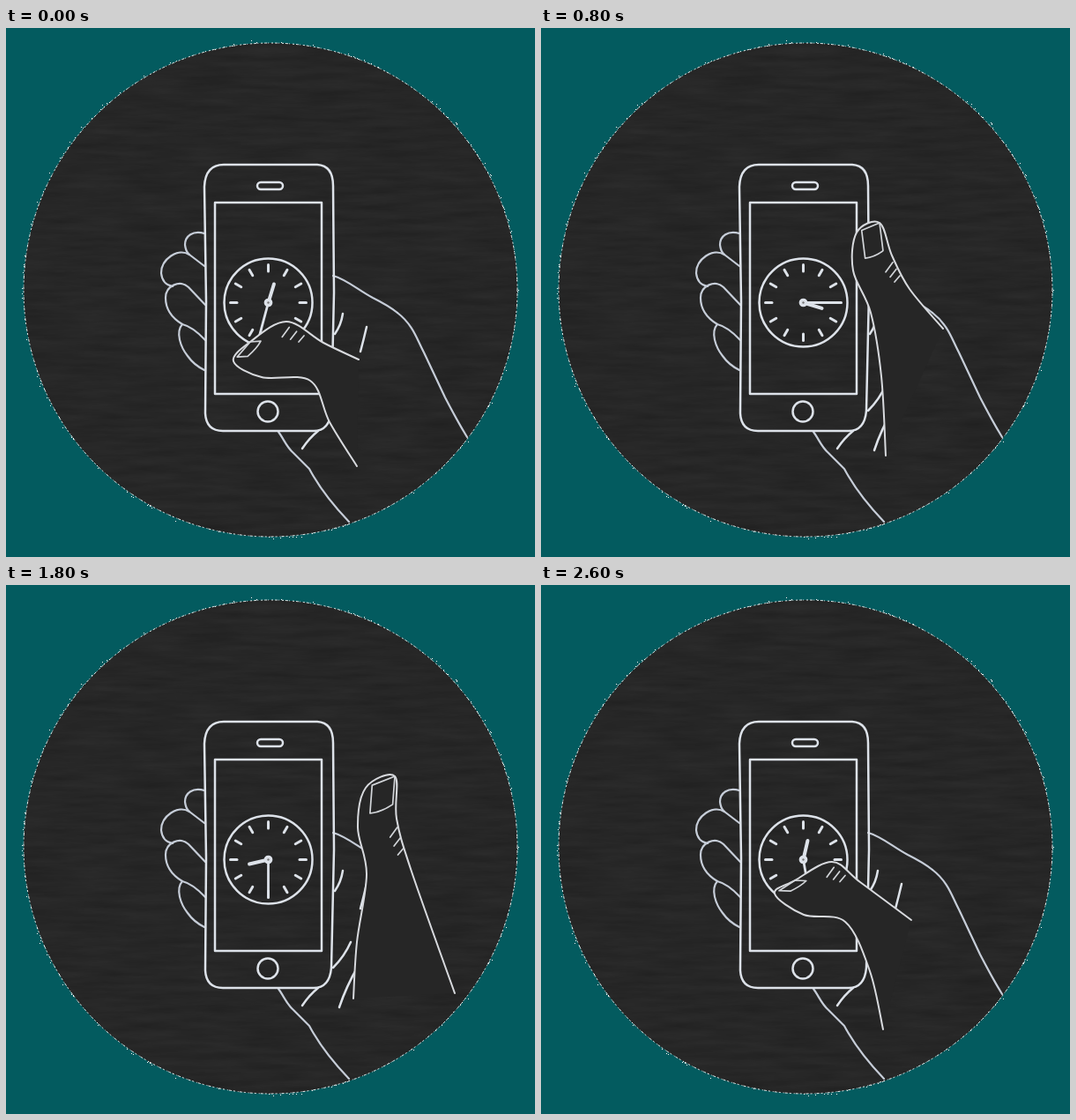
An HTML page for the animation above (2700 ms loop, 600x600 px).

```html
<!DOCTYPE html>
<html lang="en">
<head>
<meta charset="utf-8">
<title>Thumb turning a phone clock</title>
<style>
  html, body { margin: 0; width: 100%; height: 100%; overflow: hidden; background: #035b5f; }
  svg { display: block; width: 100vw; height: 100vh; }
  .chalk { fill: none; stroke: #dde2e9; stroke-width: 2.5; stroke-linecap: round; stroke-linejoin: round; }
  .soft { stroke: #c6cdd8; stroke-width: 2.2; }
  .thin { stroke: #d2d5d9; stroke-width: 1.7; }
  #thumb { fill: #262626; stroke: #d8dade; stroke-width: 2; }
</style>
</head>
<body>
<svg viewBox="0 0 600 600">
  <defs>
    <filter id="board" x="0" y="0" width="1" height="1" color-interpolation-filters="sRGB">
      <feTurbulence type="fractalNoise" baseFrequency=".015 .13" numOctaves="4" seed="4"/>
      <feColorMatrix values=".05 0 0 0 .126  .05 0 0 0 .126  .05 0 0 0 .126  0 0 0 0 1"/>
    </filter>
    <clipPath id="disc"><circle cx="300" cy="297" r="280"/></clipPath>
  </defs>

  <rect width="600" height="600" fill="#035b5f"/>
  <g clip-path="url(#disc)">
    <rect x="20" y="17" width="560" height="560" filter="url(#board)"/>
  </g>
  <g id="specks" fill="#f4f6f6"></g>
  <circle cx="300" cy="297" r="280" fill="none" stroke="#eef2f2" stroke-dasharray="2 2 3 1 1 3"/>

  <g class="chalk soft">
    <path d="M225 233C212 229 203 236 203 246Q204 254 208 257"/>
    <path d="M225 270L208 257C195 249 176 262 176 278C177 288 183 292 189 293"/>
    <path d="M226 314L207 294C198 285 181 292 181 306C181 320 190 330 200 336Q212 339 226 354"/>
    <path d="M200 336C192 345 198 362 206 372Q213 382 225 388"/>
    <path d="M309 458C315 466 318 475 326 482L344 500C352 515 365 535 389 560"/>
    <path d="M371 281C386 285 399 297 416 306Q434 315 444 323"/>
    <path id="wrist" d="M444 323C462 337 466 353 474 368L498 419Q512 446 523 464"/>
  </g>

  <g class="chalk">
    <path d="M354 457Q344 465 336 477M382 324Q380 337 373 347M409 339Q406 352 402 367"/>
    <path id="folds" d="M391 405Q384 421 371 434M399 433Q386 455 378 479"/>
    <path d="M247 155H353Q371 156 371 179L372 300L369 434Q367 457 349 457H246Q227 457 226 437L227 310L225 180Q226 155 247 155Z"/>
    <path d="M237 198H358V415H237Z"/>
    <rect x="285" y="175" width="29" height="8" rx="4"/>
    <circle cx="297" cy="435" r="11.5"/>
    <g transform="translate(297.5 311.5)">
      <circle r="50"/>
      <g id="ticks"></g>
      <path id="hour" d="M0 0V-22" stroke-width="4"/>
      <path id="minute" d="M0 0V-42" stroke-width="2.8"/>
      <circle r="3.6" fill="#dde2e9"/>
      <circle r="1.2" stroke="none" fill="#777"/>
    </g>
  </g>

  <g class="chalk">
    <path id="thumb"/>
    <path id="nail" class="thin"/>
    <path id="wrinkles" class="thin"/>
  </g>
</svg>

<script>
const LOOP = 2700, STEP = 100;
const $ = id => document.getElementById(id);
const make = (parent, tag, attrs) => {
  const el = document.createElementNS('http://www.w3.org/2000/svg', tag);
  for (const k in attrs) el.setAttribute(k, attrs[k]);
  parent.append(el);
};
const mix = (a, b, u) => a.map((v, k) => v + (b[k] - v) * u);
const move = ([x, y], dx, dy) => [x + dx, y + dy];

for (let a = 0; a < 360; a += 30) make($('ticks'), 'path', { d: 'M0 -35.5V-43', 'stroke-width': 3, transform: `rotate(${a})` });

let seed = 7;
const rand = () => (seed = seed * 16807 % 2147483647) / 2147483647;
for (let i = 0; i < 140; i++) {
  const a = rand() * Math.PI * 2, r = 280 + rand() * rand() * 4;
  make($('specks'), 'rect', { x: Math.round(299.5 + r * Math.cos(a)), y: Math.round(296.5 + r * Math.sin(a)), width: 1, height: 1 });
}

// Thumb points: wrist, inner edge, web, pad, tip (two), knuckle, joint, outer end
const points = text => text.split(' ').map(p => p.split(',').map(Number));
const raised = points('402,469 406,405 417,328 407,275 416,230 449,217 451,265 468,325 517,463');
const pose = (time, hour, minute, pts) => ({ time, values: [hour, minute, ...pts.flat()] });
const poses = [
  pose(0, 17, 195, points('398,497 367,447 345,400 290,396 258,378 277,356 318,333 360,357 400,376')),
  pose(400, 50, 660, points('386,495 361,428 338,378 290,354 261,322 284,300 332,315 368,347 431,387')),
  pose(800, 107, 1170, points('391,485 386,395 374,323 354,275 358,232 384,221 398,258 418,296 456,341')),
  pose(1400, 197, 2160, raised),
  pose(1800, 257, 3060, raised.map(p => move(p, -8, 0))),
  pose(2200, 318, 3960, points('397,500 389,425 392,355 345,318 312,284 334,262 375,284 412,285 456,350')),
  pose(2600, 373, 4490, points('388,504 373,438 345,382 298,374 265,350 288,335 330,314 362,337 420,380'))
];

// Pose by index, wrapping around the loop; the hands keep turning.
const TURN = [360, 4320];
function at(i) {
  const n = poses.length, lap = Math.floor(i / n), p = poses[i - lap * n];
  return { time: p.time + lap * LOOP, values: p.values.map((v, k) => v + lap * (TURN[k] || 0)) };
}

// Smooth curve through the poses in time
function sample(t) {
  let i = poses.length - 1;
  while (poses[i].time > t) i--;
  const [a, b, c, d] = [at(i - 1), at(i), at(i + 1), at(i + 2)];
  const span = c.time - b.time, u = (t - b.time) / span, w = 1 - u;
  return b.values.map((v, k) => {
    const m0 = (c.values[k] - a.values[k]) / (c.time - a.time) * span;
    const m1 = (d.values[k] - v) / (d.time - b.time) * span;
    return v * w * w * (1 + 2 * u) + c.values[k] * u * u * (3 - 2 * u) + m0 * u * w * w - m1 * u * u * w;
  });
}

// Catmull-Rom spline as a cubic path
function spline(pts) {
  const p = i => pts[Math.max(0, Math.min(pts.length - 1, i))];
  let d = 'M' + pts[0];
  for (let i = 0; i < pts.length - 1; i++) {
    const [a, b, c, e] = [p(i - 1), p(i), p(i + 1), p(i + 2)];
    const c1 = b.map((v, k) => v + (c[k] - a[k]) / 6);
    const c2 = c.map((v, k) => v - (e[k] - b[k]) / 6);
    d += `C${c1} ${c2} ${c}`;
  }
  return d;
}

// The nail lies along the thumb and looks longer the more upright the thumb is.
function nailPath(pad, inner, outer, knuckle) {
  const tip = mix(inner, outer, .5), root = mix(pad, knuckle, .5);
  const dx = root[0] - tip[0], dy = root[1] - tip[1], size = Math.hypot(dx, dy);
  const len = (12 + 20 * Math.max(0, dy / size)) / size;
  const base = p => move(p, dx * len, dy * len);
  const edge = mix(inner, outer, .22), curve = move(mix(base(edge), base(outer), .5), dx * .08, dy * .08);
  return `M${edge}L${outer}L${base(outer)}Q${curve} ${base(edge)}Z`;
}

function wrinklePath(knuckle, joint) {
  let d = '';
  for (let i = 0; i < 3; i++) {
    const p = mix(knuckle, joint, .1 + .2 * i);
    d += `M${move(p, -1, 4)}L${move(p, -9 + i, 15 - i * 2)}`;
  }
  return d;
}

function draw(t) {
  const [hour, minute, ...xy] = sample(t);
  const pts = [];
  for (let i = 0; i < xy.length; i += 2) pts.push([xy[i], xy[i + 1]]);
  $('hour').setAttribute('transform', `rotate(${hour})`);
  $('minute').setAttribute('transform', `rotate(${minute})`);
  $('thumb').setAttribute('d', spline(pts));
  $('nail').setAttribute('d', nailPath(...pts.slice(3, 7)));
  $('wrinkles').setAttribute('d', wrinklePath(pts[6], pts[7]));
  $('wrist').style.display = t >= 1000 && t < 2000 ? 'none' : '';
  $('folds').style.display = t >= 600 && t < 2400 ? '' : 'none';
}

const start = performance.now();
let shown = -1;
function tick() {
  const t = Math.floor((performance.now() - start) % LOOP / STEP) * STEP;
  if (t !== shown) draw(shown = t);
  requestAnimationFrame(tick);
}
tick();
</script>
</body>
</html>
```
